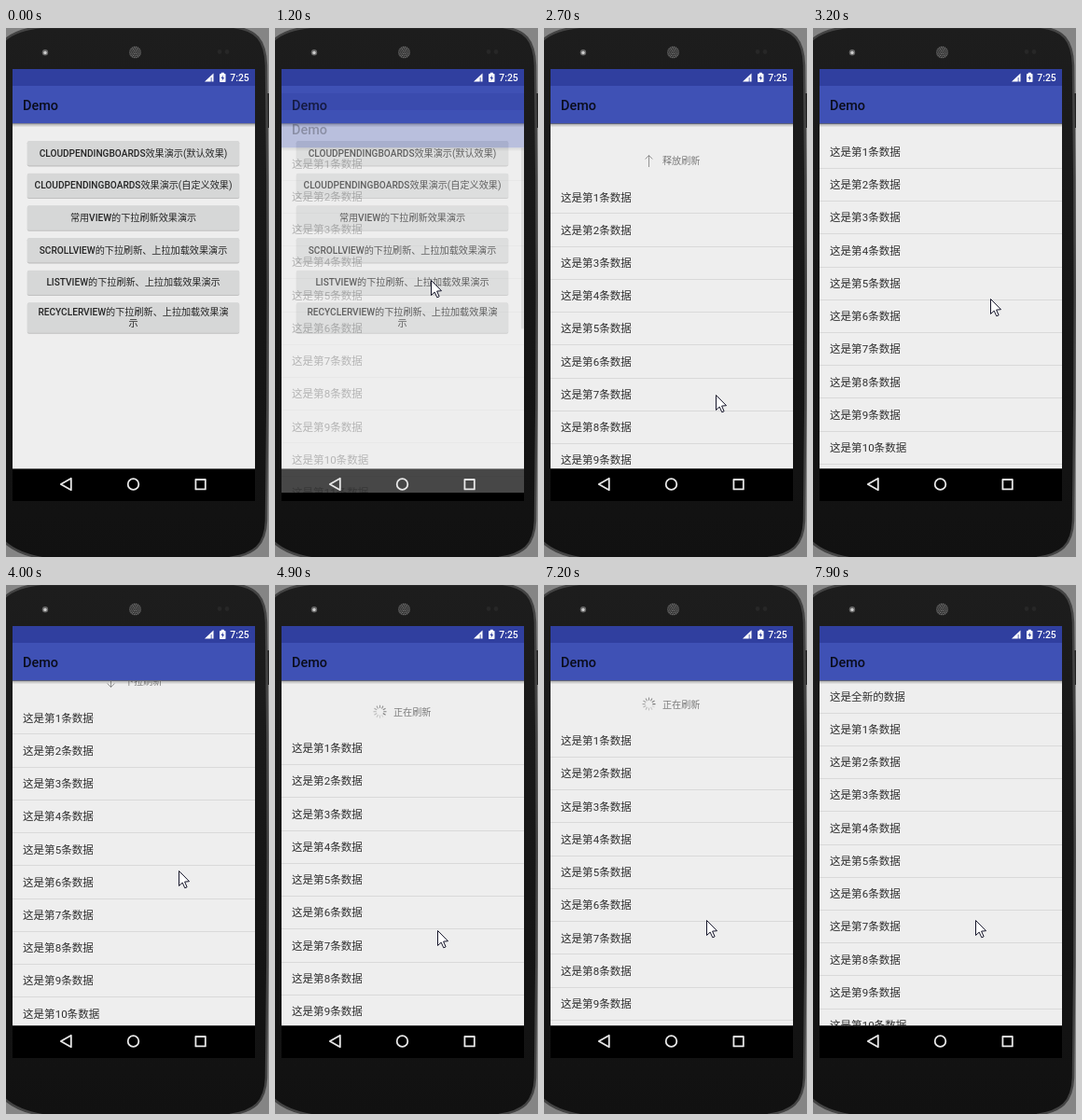
An HTML page with a canvas for the animation above (8000 ms loop, 282x567 px).

```html
<!DOCTYPE html>
<html lang="zh-CN">
<head>
<meta charset="utf-8">
<style>
html, body { margin: 0; width: 100%; height: 100%; overflow: hidden; background: #858585; }
canvas { display: block; width: 282px; height: 567px; }
</style>
</head>
<body>
<canvas id="stage"></canvas>
<script>
const W = 282, H = 567, LOOP = 8000, STEP = 100;
const LEFT = 7, WIDTH = 260, TOP = 102.4, BOTTOM = 472.4;
const DP = WIDTH / 360;
const ROW = 35.23, REFRESH = 47.4;
const RELEASED = 4900, LOADED = 7600;
const FONT = 'Roboto, "Noto Sans CJK SC", "Noto Sans CJK", sans-serif';
const TAU = Math.PI * 2;

const canvas = document.getElementById('stage');
const ctx = canvas.getContext('2d');
const ratio = window.devicePixelRatio || 1;
canvas.width = W * ratio;
canvas.height = H * ratio;

const buttons = [
  'CLOUDPENDINGBOARDS效果演示(默认效果)',
  'CLOUDPENDINGBOARDS效果演示(自定义效果)',
  '常用VIEW的下拉刷新效果演示',
  'SCROLLVIEW的下拉刷新、上拉加载效果演示',
  'LISTVIEW的下拉刷新、上拉加载效果演示',
  'RECYCLERVIEW的下拉刷新、上拉加载效果演\n示'
];

const progress = (t, from, to) => Math.min(1, Math.max(0, (t - from) / (to - from)));

function ease(t, from, to) {
  const k = progress(t, from, to);
  return k * k * (3 - 2 * k);
}

// Two drags: down and back up, then down again until released.
function motion(t) {
  const enter = ease(t, 100, 500), lift = ease(t, 1500, 1800);
  const down = ease(t, 1900, 2500), up = ease(t, 2500, 3400), again = ease(t, 3740, 4400);
  const settle = ease(t, 4800, 5200), collapse = ease(t, 7500, 7900);
  return {
    x: 244 - 77 * enter + 23 * lift - 7 * down + 8 * up - 17 * again,
    y: 139 + 131 * enter - 48 * lift + 189 * down - 139 * up + 98 * again - 11 * ease(t, 5700, 6600),
    pull: 70 * down - 65 * up + 52 * again - 9.6 * settle - REFRESH * collapse
  };
}

function rect(x, y, w, h, color) {
  ctx.fillStyle = color;
  ctx.fillRect(x, y, w, h);
}

function roundRect(x, y, w, h, r, color) {
  ctx.fillStyle = color;
  ctx.beginPath();
  ctx.roundRect(x, y, w, h, r);
  ctx.fill();
}

function disc(x, y, r, color) {
  ctx.fillStyle = color;
  ctx.beginPath();
  ctx.arc(x, y, r, 0, TAU);
  ctx.fill();
}

function polygon(...points) {
  ctx.beginPath();
  points.forEach(([x, y]) => ctx.lineTo(x, y));
  ctx.closePath();
}

function line(x1, y1, x2, y2) {
  ctx.beginPath();
  ctx.moveTo(x1, y1);
  ctx.lineTo(x2, y2);
  ctx.stroke();
}

function text(label, x, y, size, color, weight = 400) {
  ctx.font = `${weight} ${size}px ${FONT}`;
  ctx.fillStyle = color;
  ctx.fillText(label, x, y + size * 0.36);
  return ctx.measureText(label).width;
}

// Latin runs are medium weight, Chinese runs regular.
function mixedText(label, center, y, size, color) {
  const runs = label.split(/([A-Z]+)/).filter(Boolean);
  const weight = run => /[A-Z]/.test(run) ? 500 : 400;
  const width = run => {
    ctx.font = `${weight(run)} ${size}px ${FONT}`;
    return ctx.measureText(run).width;
  };
  let x = center - runs.reduce((sum, run) => sum + width(run), 0) / 2;
  runs.forEach(run => { x += text(run, x, y, size, color, weight(run)); });
}

function drawPhone() {
  rect(0, 0, W, H, '#858585');
  rect(279, 70, 3, 37, '#222');
  ctx.beginPath();
  ctx.moveTo(-6, 18);
  ctx.quadraticCurveTo(6, 2, 38, -1);
  ctx.lineTo(244, -1);
  ctx.bezierCurveTo(268, 2, 278, 12, 279, 40);
  ctx.quadraticCurveTo(282.5, 285, 279, 528);
  ctx.bezierCurveTo(278, 555, 266, 564, 240, 568);
  ctx.lineTo(44, 569);
  ctx.quadraticCurveTo(8, 564, -6, 546);
  ctx.closePath();
  const shade = ctx.createLinearGradient(0, 0, 0, H);
  shade.addColorStop(0, '#1d1d1d');
  shade.addColorStop(1, '#111');
  ctx.fillStyle = shade;
  ctx.fill();
  ctx.strokeStyle = '#444';
  ctx.lineWidth = 2.5;
  ctx.stroke();

  disc(42, 26.3, 3.2, '#666');
  disc(42, 26.5, 1.7, '#ccc');
  disc(138.5, 26, 6.6, '#303030');
  for (let ring = 0; ring < 4; ring++) {
    const count = ring * 6 || 1;
    for (let i = 0; i < count; i++) {
      const a = i / count * TAU;
      disc(138.5 + Math.cos(a) * ring * 1.9, 26 + Math.sin(a) * ring * 1.9, 0.6, '#858585');
    }
  }
  disc(229, 25.5, 2.4, '#272727');
  disc(237, 25.5, 2.4, '#272727');
}

function drawBars() {
  rect(LEFT, 44, WIDTH, 18, '#303f9f');
  rect(LEFT, 62, WIDTH, TOP - 62, '#3f51b5');
  text('Demo', 18, 82.5, 20 * DP, 'rgba(0,0,0,.85)', 500);
}

function drawBarShadow() {
  const shade = ctx.createLinearGradient(0, TOP, 0, TOP + 4);
  shade.addColorStop(0, 'rgba(0,0,0,.3)');
  shade.addColorStop(1, 'rgba(0,0,0,0)');
  rect(LEFT, TOP, WIDTH, 4, shade);
}

function drawHome(t) {
  drawBars();
  rect(LEFT, TOP, WIDTH, BOTTOM - TOP, '#eee');
  drawBarShadow();
  buttons.forEach((label, i) => {
    const lines = label.split('\n');
    const y = 121 + i * 48 * DP;
    const h = 26.3 + (lines.length - 1) * 6;
    const press = i === 4 && t < 1100 ? progress(t, 700, 900) : 0;
    const gray = 214 - 16 * press;
    roundRect(22.8, y + 0.5, 227.4, h + 0.6 + press, 1.8, '#c0c0c0');
    roundRect(23, y, 227, h, 1.5, `rgb(${gray},${gray + 1},${gray + 1})`);
    lines.forEach((part, n) => {
      const center = y + h / 2 + (n - (lines.length - 1) / 2) * 12;
      mixedText(part, 136.5, center, 14 * DP, 'rgba(0,0,0,.83)');
    });
  });
}

function drawArrow(y, angle) {
  ctx.save();
  ctx.translate(112.5, y);
  ctx.rotate(angle);
  ctx.strokeStyle = '#888';
  ctx.lineWidth = 0.9;
  line(0, -6.5, 0, 6);
  line(-3.8, 2, 0, 6);
  line(3.8, 2, 0, 6);
  ctx.restore();
}

function drawSpinner(y, t) {
  const head = t / STEP % 12;
  ctx.lineWidth = 1.1;
  for (let i = 0; i < 12; i++) {
    const a = i / 12 * TAU, c = Math.cos(a), s = Math.sin(a);
    const age = (head - i + 12) % 12;
    ctx.strokeStyle = `rgba(100,100,100,${0.85 - age * 0.06})`;
    line(112.5 + c * 3.8, y + s * 3.8, 112.5 + c * 7, y + s * 7);
  }
}

function drawHeader(t, pull) {
  if (pull <= 0 || t >= LOADED) return;
  const y = TOP + pull - 21.7;
  const busy = t >= RELEASED;
  const label = busy ? '正在刷新' : pull >= REFRESH ? '释放刷新' : '下拉刷新';
  text(label, 127, y, 14 * DP, '#7c7c7c');
  if (busy) {
    drawSpinner(y - 0.5, t);
  } else {
    const turn = start => progress(t, start, start + 200);
    drawArrow(y, Math.PI * (turn(2255) - turn(2860) + turn(4209)));
  }
}

function drawList(t, pull) {
  drawBars();
  ctx.save();
  ctx.beginPath();
  ctx.rect(LEFT, TOP, WIDTH, BOTTOM - TOP);
  ctx.clip();
  rect(LEFT, TOP, WIDTH, BOTTOM - TOP, '#eee');
  drawHeader(t, pull);
  for (let i = 0; i < 12; i++) {
    const y = TOP + pull + i * ROW;
    const n = t >= LOADED ? i : i + 1;
    text(n ? `这是第${n}条数据` : '这是全新的数据', 18, y + 17.2, 16 * DP, 'rgba(0,0,0,.8)');
    rect(LEFT, Math.floor(y + ROW - 0.5), WIDTH, 1, 'rgba(0,0,0,.09)');
  }
  if (t < 2000) rect(264, TOP, 3, 194, 'rgba(0,0,0,.25)');
  drawBarShadow();
  ctx.restore();
}

function drawStatus() {
  ctx.fillStyle = '#fff';
  polygon([213, 57.5], [222.5, 57.5], [222.5, 48.5]);
  ctx.fill();
  rect(219.7, 53, 0.8, 5, '#303f9f');
  roundRect(229, 49, 6.5, 9, 0.8, '#fff');
  rect(230.8, 47.8, 3, 1.5, '#fff');
  ctx.fillStyle = '#303f9f';
  polygon([232.8, 50.5], [230.6, 54], [232, 54], [231.7, 56.7], [234, 53], [232.6, 53]);
  ctx.fill();
  text('7:25', 240.3, 53, 10.4, '#fff', 500);
}

function drawNavIcons() {
  ctx.strokeStyle = '#e8e8e8';
  ctx.lineWidth = 1.8;
  ctx.lineJoin = 'round';
  polygon([58.8, 489], [69.8, 482.8], [69.8, 495.2]);
  ctx.stroke();
  ctx.beginPath();
  ctx.arc(136.5, 489, 5.8, 0, TAU);
  ctx.stroke();
  ctx.strokeRect(203.4, 484, 10.4, 10.4);
}

function drawPointer(x, y) {
  ctx.save();
  ctx.translate(Math.round(x) + 0.5, Math.round(y) + 0.5);
  polygon([0, 0], [0, 16], [3.7, 12.6], [6.3, 18.3], [8.6, 17.3], [6.1, 11.6], [11, 11.2]);
  ctx.fillStyle = '#fff';
  ctx.fill();
  ctx.strokeStyle = '#15152a';
  ctx.lineWidth = 1;
  ctx.lineJoin = 'miter';
  ctx.stroke();
  ctx.restore();
}

function draw(t) {
  const { x, y, pull } = motion(t);
  const opened = progress(t, 1150, 1317);
  ctx.setTransform(ratio, 0, 0, ratio, 0, 0);
  drawPhone();
  rect(LEFT, BOTTOM, WIDTH, 507 - BOTTOM, '#000');
  if (opened < 1) drawHome(t);
  if (opened > 0) {
    ctx.save();
    ctx.globalAlpha = opened;
    ctx.translate(0, 37 * (1 - opened));
    drawList(t, pull);
    ctx.restore();
  }
  drawStatus();
  drawNavIcons();
  if (t >= 100) drawPointer(x, y);
}

const start = performance.now();
function tick() {
  const t = (performance.now() - start) % LOOP;
  draw(Math.floor(t / STEP) * STEP);
  requestAnimationFrame(tick);
}
tick();
</script>
</body>
</html>
```
